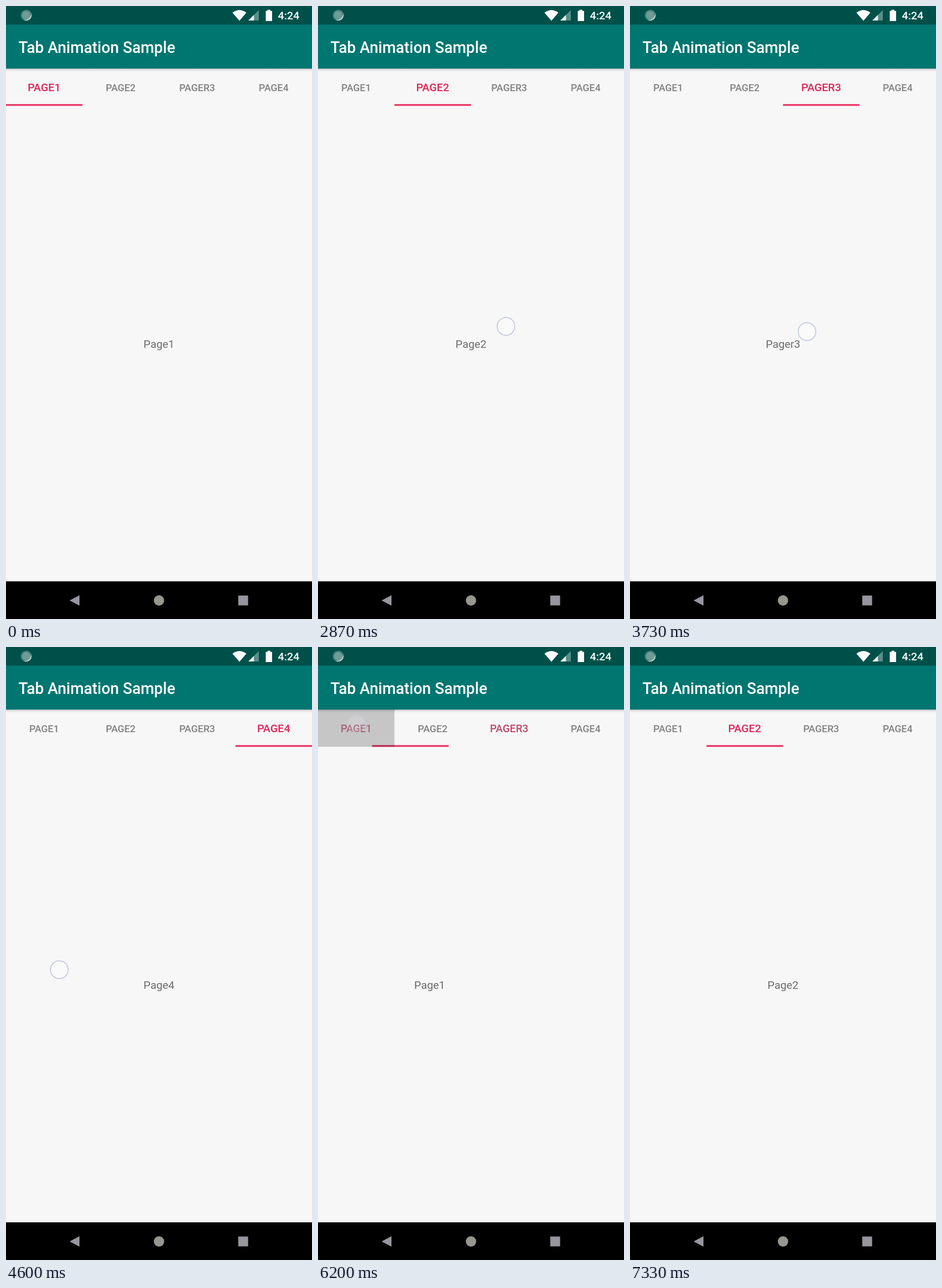
Animation, 529 px wide and 1058 px high, one loop 7.59 s. Source, as an HTML page:

```html
<!DOCTYPE html>
<html>
<head>
<meta charset="utf-8">
<style>
  html, body { margin: 0; width: 100%; height: 100%; overflow: hidden; background: #f7f7f8; }
  svg { display: block; width: 529px; height: 1058px; font-family: Roboto, sans-serif; font-size: 18.9px; }
  .medium { font-weight: 500; }
  .mid { text-anchor: middle; }
</style>
</head>
<body>
<svg viewBox="0 0 529 1058">
  <defs>
    <linearGradient id="shade" x2="0" y2="1">
      <stop stop-opacity=".28"/>
      <stop offset=".4" stop-opacity=".09"/>
      <stop offset="1" stop-opacity="0"/>
    </linearGradient>
    <clipPath id="tabClip"><rect id="tabBox" y="108" width="132.25" height="64.3"/></clipPath>
  </defs>
  <rect width="529" height="1058" fill="#f7f7f8"/>
  <g id="pages" class="mid" fill="#6b6b6c"></g>

  <rect id="indicator" y="169.4" width="132.25" height="2.9" fill="#ea2a5c"/>
  <g id="ripple" clip-path="url(#tabClip)">
    <rect y="108" width="529" height="65" fill-opacity=".1"/>
    <circle id="wave" cy="140" fill-opacity=".11"/>
  </g>
  <g id="tabs" class="mid medium"></g>

  <rect y="107.5" width="529" height="6" fill="url(#shade)"/>
  <rect width="529" height="108" fill="#007671"/>
  <rect width="529" height="32" fill="#00504a"/>
  <g fill="#fff">
    <text class="medium" x="21.5" y="80.5" font-size="26.9">Tab Animation Sample</text>
    <text class="medium" x="470" y="23">4:24</text>
    <path d="M391.5 11.5Q403.500 2.500 415.500 11.500L403.500 25.500Z"/>
    <path d="M437 7V25H419Z" opacity=".35"/>
    <path d="M428.500 15.500V25H419Z"/>
    <path d="M452 8.500V6.500H457V8.500H460V26H449V8.500Z"/>
  </g>
  <circle cx="35" cy="16" r="7.500" fill="#6f9c97"/>
  <circle cx="35" cy="16" r="8.500" fill="none" stroke="#a9c4c1" stroke-width="1.500" stroke-dasharray="1.500 1.200"/>
  <path d="M43 12A9 9 0 0 1 30 23.500A10 10 0 0 0 43 12" fill="#d5e3e1"/>

  <rect y="993" width="529" height="65"/>
  <g fill="#97969c">
    <path d="M110 1026L127 1017V1035Z"/>
    <circle cx="264.500" cy="1026" r="9" fill="#98978f"/>
    <rect x="401.500" y="1017.500" width="17" height="17"/>
  </g>
  <circle id="spot" r="15.300" fill="#fff" fill-opacity=".35" stroke="#c6c9e2" stroke-width="1.700"/>
</svg>
<script>
const LOOP = 7590, STEP = 1000 / 15, WIDTH = 529, TAB = WIDTH / 4, SLOP = 21;
const names = ['Page1', 'Page2', 'Pager3', 'Page4'];
const grey = [129, 129, 131], pink = [224, 38, 88];

// A gesture with dx is a swipe, one without is a tap on a tab.
const gestures = [
  { down: 2060, up: 2335, from: 0, to: 1, x: 436, y: 550, dx: -245 },
  { down: 2860, up: 3270, from: 1, to: 2, x: 325, y: 553, dx: -235 },
  { down: 3660, up: 4080, from: 2, to: 3, x: 313, y: 562, dx: -230 },
  { down: 4595, up: 4805, from: 3, to: 2, x: 92, y: 557, dx: 235 },
  { down: 5795, up: 6075, from: 2, to: 0, x: 66, y: 132 },
  { down: 6595, up: 6845, from: 0, to: 1, x: 198, y: 132 }
];
const idle = { down: -9999, up: -9999, from: 0, to: 0, x: 0, y: 0 };

const $ = id => document.getElementById(id);
const clamp = v => Math.min(1, Math.max(0, v));
const mix = (a, b, k) => a + (b - a) * k;
const easeInOut = k => (1 - Math.cos(Math.PI * k)) / 2;
const settle = k => 1 - (1 - k) ** 5;

// cubic-bezier(.4, 0, .2, 1)
function fastOutSlowIn(x) {
  let lo = 0, hi = 1;
  for (let i = 0; i < 20; i++) {
    const s = (lo + hi) / 2, r = 1 - s;
    if (1.2 * r * r * s + .6 * r * s * s + s ** 3 < x) lo = s; else hi = s;
  }
  return lo * lo * (3 - 2 * lo);
}

function addText(parent, content) {
  const el = document.createElementNS('http://www.w3.org/2000/svg', 'text');
  el.textContent = content;
  return $(parent).appendChild(el);
}
const pages = names.map(name => addText('pages', name));
const tabs = names.map(name => addText('tabs', name.toUpperCase()));
pages.forEach(page => page.setAttribute('y', 590));
tabs.forEach(tab => tab.setAttribute('y', 6.8));

function draw(t) {
  const g = gestures.findLast(g => g.down <= t) || idle;
  const since = t - g.up;
  const drag = (g.dx || 0) * clamp((t - g.down) / (g.up - g.down)) ** 2;

  const dragged = -Math.sign(drag) * Math.max(0, Math.abs(drag) - SLOP) / WIDTH;
  const duration = g.dx ? 330 : 100 * (1 + Math.abs(g.to - g.from));
  const scroll = mix(g.from + dragged, g.to, settle(clamp(since / duration)));
  const line = g.dx ? scroll : mix(g.from, g.to, fastOutSlowIn(clamp(since / 300)));

  pages.forEach((page, i) => page.setAttribute('x', WIDTH / 2 + (i - scroll) * WIDTH));
  $('indicator').setAttribute('x', line * TAB);

  const chosen = easeInOut(clamp(since / 300));
  tabs.forEach((tab, i) => {
    const k = i === g.to ? (g.to === g.from ? 1 : chosen) : i === g.from ? 1 - chosen : 0;
    tab.setAttribute('transform', `translate(${(i + .5) * TAB - .2} 140.5) scale(${mix(.9, 1, k)})`);
    tab.setAttribute('fill', `rgb(${grey.map((c, n) => Math.round(mix(c, pink[n], k)))})`);
  });

  const press = t - g.down - 60;
  const shown = !g.dx && g !== idle;
  $('ripple').setAttribute('opacity', shown ? clamp(press / 75) * (1 - clamp((since - 130) / 310)) : 0);
  $('tabBox').setAttribute('x', g.to * TAB);
  $('wave').setAttribute('cx', (g.to + .5) * TAB);
  $('wave').setAttribute('r', mix(20, 75, settle(clamp(press / 225))));

  $('spot').setAttribute('transform', `translate(${g.x + drag} ${g.y})`);
  $('spot').setAttribute('opacity', 1 - clamp(since / 200));
}

function tick() {
  const t = performance.now() % LOOP;
  draw(Math.floor((t + 4) / STEP) * STEP);
  requestAnimationFrame(tick);
}
tick();
</script>
</body>
</html>
```
